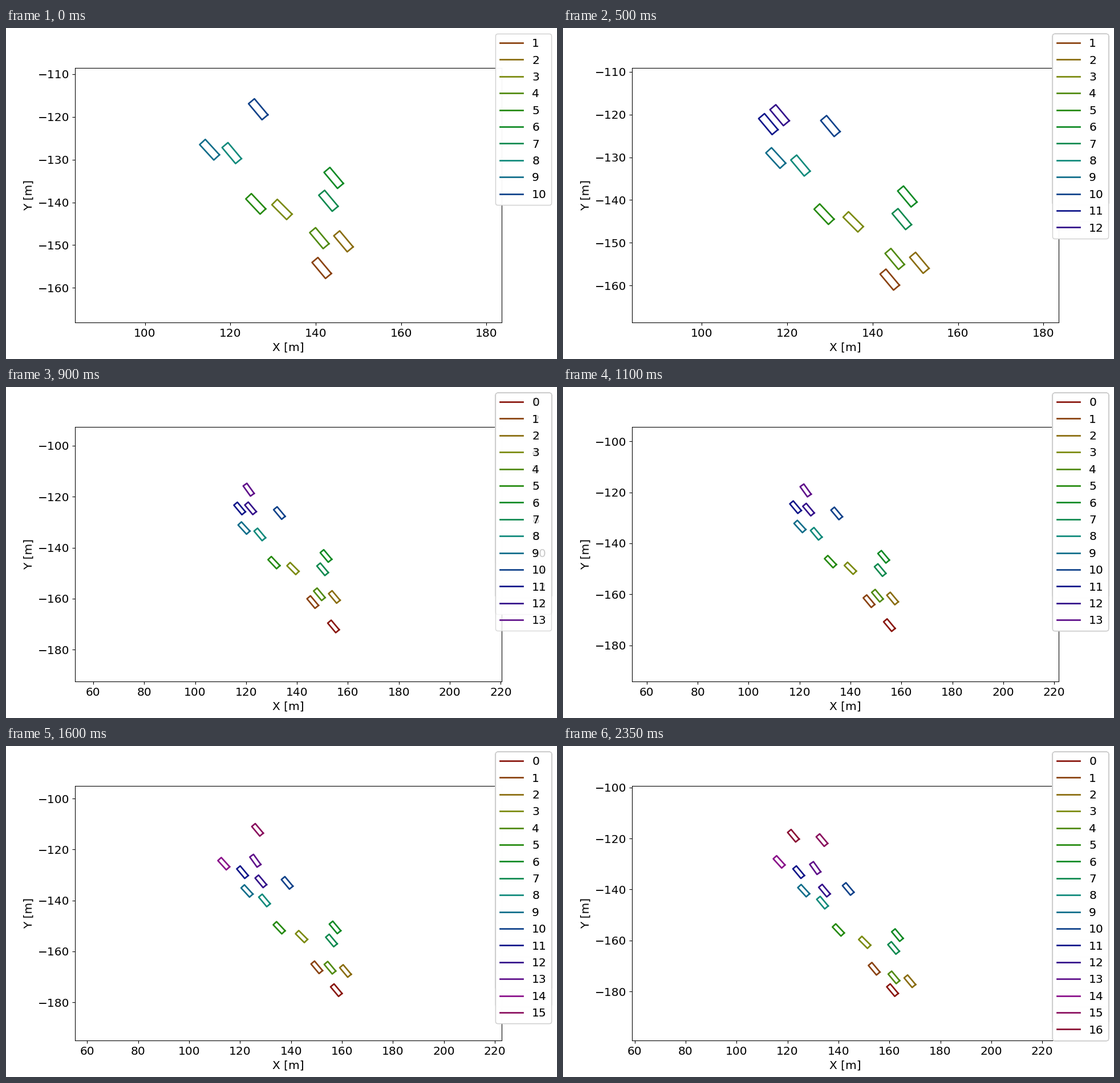
Animation, 966 px wide and 580 px high, one loop 2400 ms. Source, as a matplotlib script:

```python
import colorsys
from itertools import count

import matplotlib.pyplot as plt
import numpy as np
from matplotlib.animation import FuncAnimation

WIDTH, HEIGHT, DPI = 966, 580, 100
FRAMES, INTERVAL = 48, 50
LAST_STEP = 58
SPAN = 100                 # metres kept in view around the mean position
PT = 0.966                 # scale of all point sizes
FONT = 15 * PT
ROW = 29.4                 # pixels from one legend row to the next
LIVE_LEGENDS = 5           # newest legends drawn in full, older ones as boxes

# The road is straight: distances run along it, lanes lie side by side.
ROAD = np.radians(51.3)
ALONG = np.array([np.cos(ROAD), -np.sin(ROAD)])
ACROSS = np.array([np.sin(ROAD), np.cos(ROAD)])
FIRST_LANE, LANE_GAP = 13.4, 3.75
EDGE = 236.8               # the camera sees x - y beyond this
MERGE_GAIN = 0.06          # merging vehicles speed up in proportion to drift
TILT = 50
LENGTH, BREADTH = 4.9, 1.8


class Vehicle:
    ids = count()

    def __init__(self, lane, place, speed, drift=0, enter=0):
        self.id = next(self.ids)
        self.offset = FIRST_LANE + LANE_GAP * lane
        self.place, self.speed = place, speed    # place at half time
        self.drift, self.enter = drift, enter
        angle = -np.radians(TILT) + drift / speed
        self.ahead = np.array([np.cos(angle), np.sin(angle)]) * LENGTH / 2
        self.side = np.array([-np.sin(angle), np.cos(angle)]) * BREADTH / 2

    def center(self, step):
        t = step - LAST_STEP / 2
        gain = MERGE_GAIN * max(self.drift, 0)
        along = self.place + self.speed * t + gain * t * t / 2
        return along * ALONG + (self.offset + self.drift * t) * ACROSS

    def seen(self, step):
        x, y = self.center(step)
        return step >= self.enter and x - y > EDGE

    def outline(self, step):
        signs = [(1, 1), (1, -1), (-1, -1), (-1, 1), (1, 1)]
        return self.center(step) + [p * self.ahead + q * self.side for p, q in signs]


VEHICLES = [
    Vehicle(0.05, 232.0, 0.306, enter=22),
    Vehicle(-0.05, 219.75, 0.348),
    Vehicle(2.05, 225.2, 0.594),
    Vehicle(0.6, 205.3, 0.453, drift=0.039),
    Vehicle(1, 220.6, 0.577),
    Vehicle(-0.6, 198.2, 0.36, drift=0.021),
    Vehicle(4.05, 210.1, 0.522),
    Vehicle(2.9, 213.3, 0.515),
    Vehicle(0.05, 186.2, 0.369),
    Vehicle(-0.8, 179.8, 0.293, drift=0.013),
    Vehicle(3.05, 185.2, 0.477),
    Vehicle(0.1, 172.85, 0.306),
    Vehicle(1, 177.3, 0.566),
    Vehicle(2, 170.55, 0.482, drift=-0.036),
    Vehicle(-0.9, 166.2, 0.253, drift=0.01),
    Vehicle(4.1, 160.4, 0.594),
    Vehicle(2.05, 157.1, 0.42),
]


def color(i):
    return colorsys.hls_to_rgb((i / len(VEHICLES) + 0.01) % 1, 0.3, 0.8)


plt.rcParams.update({
    "font.family": "DejaVu Sans", "font.size": FONT,
    "lines.linewidth": 2 * PT, "axes.linewidth": 0.8 * PT,
    "patch.linewidth": PT,
})
fig, ax = plt.subplots(figsize=(WIDTH / DPI, HEIGHT / DPI), dpi=DPI)
ax.set_xlabel("X [m]")
ax.set_ylabel("Y [m]")
box = ax.get_window_extent()
RATIO = box.height / box.width

# Label spacing that gives the wanted row height
probe = fig.text(0, 0, "lp")
spacing = (ROW - probe.get_window_extent().height) / (FONT * DPI / 72)
probe.remove()

lines = [ax.plot([], [], color=color(v.id))[0] for v in VEHICLES]
seen_ids = [tuple(v.id for v in VEHICLES if v.seen(s)) for s in range(LAST_STEP + 1)]
legends = {
    ids: fig.legend([lines[i] for i in ids], [str(i) for i in ids],
                    loc="upper right", labelspacing=spacing)
    for ids in dict.fromkeys(seen_ids)
}
fig.canvas.draw()          # settles the legend boxes


def set_view(corners):
    cx, cy = np.mean([c[:4].mean(axis=0) for c in corners], axis=0)
    ys = np.concatenate(corners)[:, 1]
    # Shrink y to keep equal scales while the data fits, else widen x.
    fits = 1.05 * np.ptp(ys) < SPAN * RATIO
    half = SPAN / 2 if fits else SPAN / 2 / RATIO
    ax.set_xlim(cx - half, cx + half)
    ax.set_ylim(cy - half * RATIO, cy + half * RATIO)


def update(frame):
    step = frame * 5 // 4
    ids = seen_ids[step]
    corners = [VEHICLES[i].outline(step) for i in ids]
    for line in lines:
        line.set_data([], [])
    for i, c in zip(ids, corners):
        lines[i].set_data(c[:, 0], c[:, 1])
    set_view(corners)

    # The half-transparent legends pile up step by step.
    pile = [legends[seen_ids[s]] for s in [0, *range(step + 1)]]
    fig.patches[:] = [g.get_frame() for g in pile[:-LIVE_LEGENDS]]
    fig.legends[:] = pile[-LIVE_LEGENDS:]
    return lines


anim = FuncAnimation(fig, update, frames=FRAMES, interval=INTERVAL,
                     repeat=True, cache_frame_data=False)
plt.show()
```
